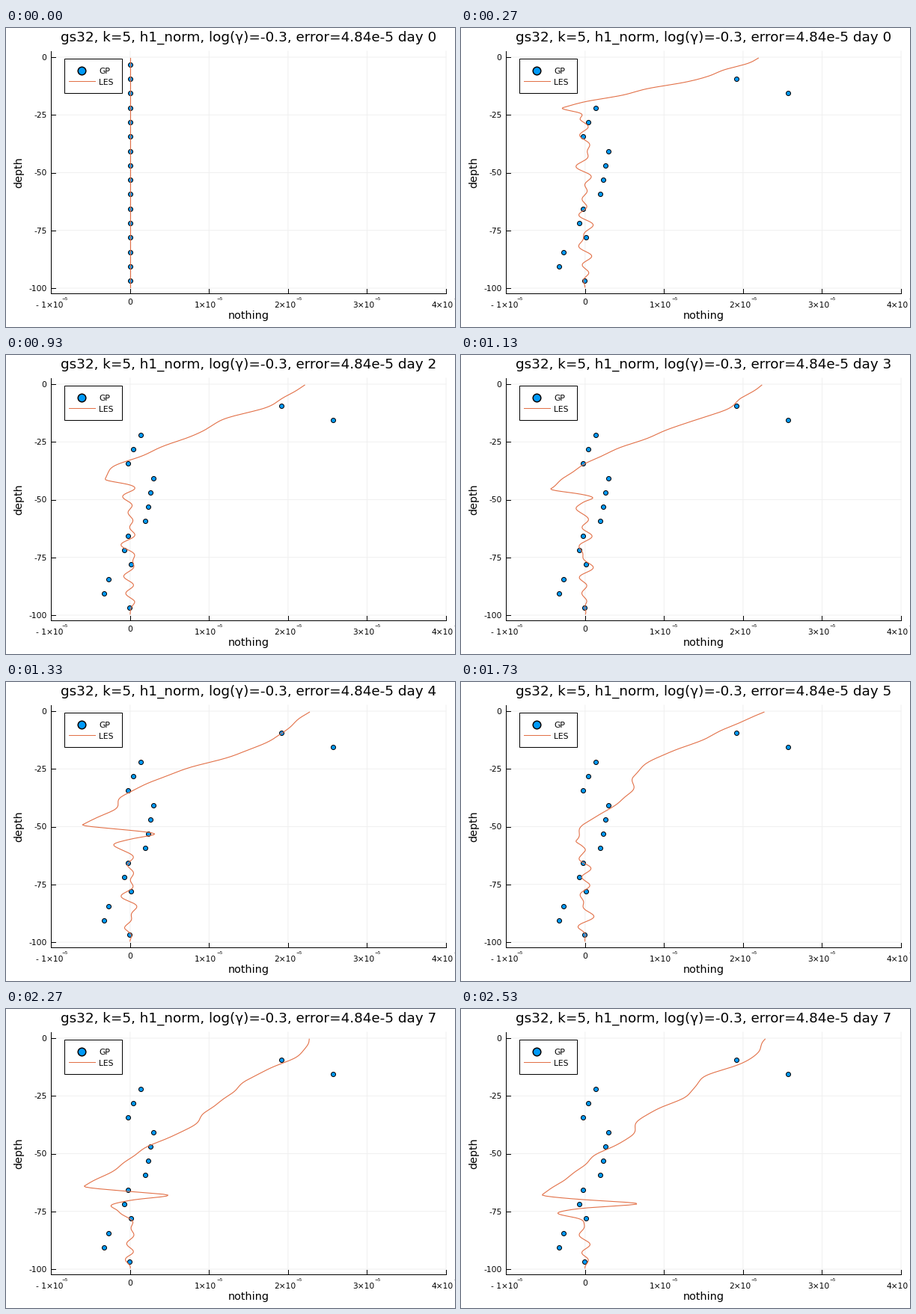
Animation of 600x400 px, one loop 2.59 s. Source, as a matplotlib script:

```python
import numpy as np
import matplotlib.pyplot as plt
from matplotlib.animation import FuncAnimation
from matplotlib.patches import Rectangle

W, H = 600, 400
PX = 72 / 100                     # points per pixel
ZERO, UNIT = 165.8, 105.55        # x of the value 0, pixels per 1e-5
TOP, SCALE = 39, 3.09             # y of the surface, pixels per metre
LEFT, RIGHT, UPPER, LOWER = 60, 588, 31, 355
BLUE, ORANGE, GRID = "#009afa", "#e26f46", "#f0f0f0"
STEPS = 39
DAYS_PER_STEP = 5 / 24

plt.rcParams["font.family"] = "DejaVu Sans"
fig = plt.figure(figsize=(W / 100, H / 100), dpi=100, facecolor="white")
ax = fig.add_axes([0, 0, 1, 1])
ax.set(xlim=(0, W), ylim=(H, 0))
ax.axis("off")


def line(xs, ys, color="black", width=1.0, z=1, **kw):
    return ax.plot(xs, ys, color=color, lw=width * PX, zorder=z, **kw)[0]


def label(x, y, text, size, ha="left", va="baseline", **kw):
    return ax.text(x, y, text, fontsize=size * PX, ha=ha, va=va, zorder=6, **kw)


def dots(xs, ys, size, edge, z):
    return ax.plot(xs, ys, "o", ms=size * PX, mew=edge * PX, mfc=BLUE,
                   mec="black", zorder=z, snap=False)[0]


def draw_axes():
    for value in range(-1, 5):
        x = ZERO + value * UNIT
        line([x, x], [UPPER, LOWER], GRID, snap=False)
        line([x, x], [LOWER, LOWER - 6], z=2)
        if value == 0:
            label(x, 369.5, "0", 10.6, "center")
            continue
        text = f"{value}×10".replace("-", "- ")
        start = x - (20.5 if value < 0 else 19.2)
        label(start, 374, text, 10.6)
        label(x + (14.5 if value < 0 else 10), 364.5, "−5", 5.6)
    for depth in range(0, 101, 25):
        y = TOP + depth * SCALE
        line([LEFT, RIGHT], [y, y], GRID, snap=False)
        line([LEFT, LEFT + 6], [y, y], z=2)
        label(54.5, y + 3.8, f"{-depth}", 10.6, "right")
    line([LEFT, LEFT], [UPPER, LOWER], z=2)
    line([LEFT, RIGHT], [LOWER, LOWER], z=2)
    label(324.3, 388.5, "nothing", 14.4, "center")
    label(17.3, 193.5, "depth", 14.4, "center", "center", rotation=90)


def draw_legend():
    ax.add_patch(Rectangle((78, 41), 77, 46, fc="white", ec="black",
                           lw=PX, zorder=5))
    dots([101.2], [56.8], 10.6, 1.5, 6)
    line([83.5, 119], [71, 71], ORANGE, z=6)
    label(124.3, 61, "GP", 10.7)
    label(124.3, 76, "LES", 10.7)


# Flux (1e-5) at equal spacing from the surface to the mixed layer base.
MIXED = {
    8: [2.22, 2.05, 1.76, 1.54, 1.25, .80, .46, 0, -.31],
    14: [2.24, 1.99, 1.68, 1.18, .91, .51, .15, -.21, -.32],
    20: [2.27, 2.04, 1.81, 1.36, .76, .26, -.10, -.22, -.61],
    26: [2.28, 1.82, 1.38, .84, .64, .57, .32, -.01, -.13],
    31: [2.25, 2.13, 1.61, 1.30, 1.12, .79, .16, -.13, -.61],
    38: [2.29, 2.11, 1.52, 1.26, .74, .57, .14, -.18, -.55],
}
KICK = [0, 0, .28, .04, .28, .75]     # strength of the pulse below the base
LES_DEPTH = np.linspace(.4, 99.6, 255)


def in_time(step, values):
    return np.interp(step, list(MIXED), values)


def cubic(knots, u):
    """Smooth curve through equally spaced knots, u counted in knots."""
    i = np.clip(u.astype(int), 0, len(knots) - 2)
    t = u - i
    m = np.gradient(knots)
    return (knots[i] * (1 + 2 * t) * (1 - t) ** 2 + m[i] * t * (1 - t) ** 2
            + knots[i + 1] * t * t * (3 - 2 * t) - m[i + 1] * t * t * (1 - t))


def bell(x, width):
    return np.exp(-(x / width) ** 2)


def waves(step):
    rng = np.random.default_rng(step)
    return sum(np.sin(2 * np.pi * (LES_DEPTH / length + rng.random()))
               for length in (7, 11, 17))


def les_flux(step):
    if step == 0:
        return np.zeros_like(LES_DEPTH)
    base = 11 * np.sqrt(step)         # deepens with the root of time
    knots = np.array([in_time(step, row) for row in zip(*MIXED.values())])
    above = cubic(knots, np.clip(LES_DEPTH / base, 0, 1) * (len(knots) - 1))
    below = LES_DEPTH - base
    pulse = bell(below - 3.9, 1.4) - .6 * bell(below - 8, 2)
    flux = np.where(below < 0, above, knots[-1] * bell(below, 1.8))
    flux += in_time(step, KICK) * pulse
    calm = np.clip(below / 5, .25, 1) * np.clip((100 - LES_DEPTH) / 6, 0, 1)
    return flux + .04 * calm * waves(step)


GP_DEPTH = 3.125 + 6.25 * np.arange(16)
GP_FLUX = np.array([np.nan, 1.92, 2.57, .133, .037, -.022, .296, .255, .225,
                    .19, -.028, -.07, .014, -.272, -.33, -.008])

draw_axes()
draw_legend()
title = label(324.3, 17.3, "", 18.4, "center")
gp = dots(np.full(16, ZERO), TOP + SCALE * GP_DEPTH, 6, 1, 3)
les = line(np.full(255, ZERO), TOP + SCALE * LES_DEPTH, ORANGE, 1.1, 4)

curves = [ZERO + UNIT * les_flux(n) for n in range(STEPS)]
starts = [round(n * 20 / 3) for n in range(STEPS)]   # 15 per second, in 10 ms


def update(tick):
    step = int(np.searchsorted(starts, tick, side="right")) - 1
    day = int(step * DAYS_PER_STEP)
    title.set_text(f"gs32, k=5, h1_norm, log(γ)=-0.3, error=4.84e-5 day {day}")
    gp.set_xdata(ZERO + UNIT * (GP_FLUX if step else 0 * GP_DEPTH))
    les.set_xdata(curves[step])
    return title, gp, les


anim = FuncAnimation(fig, update, frames=259, interval=10, repeat=True,
                     repeat_delay=0, init_func=lambda: update(0))
plt.show()
```
